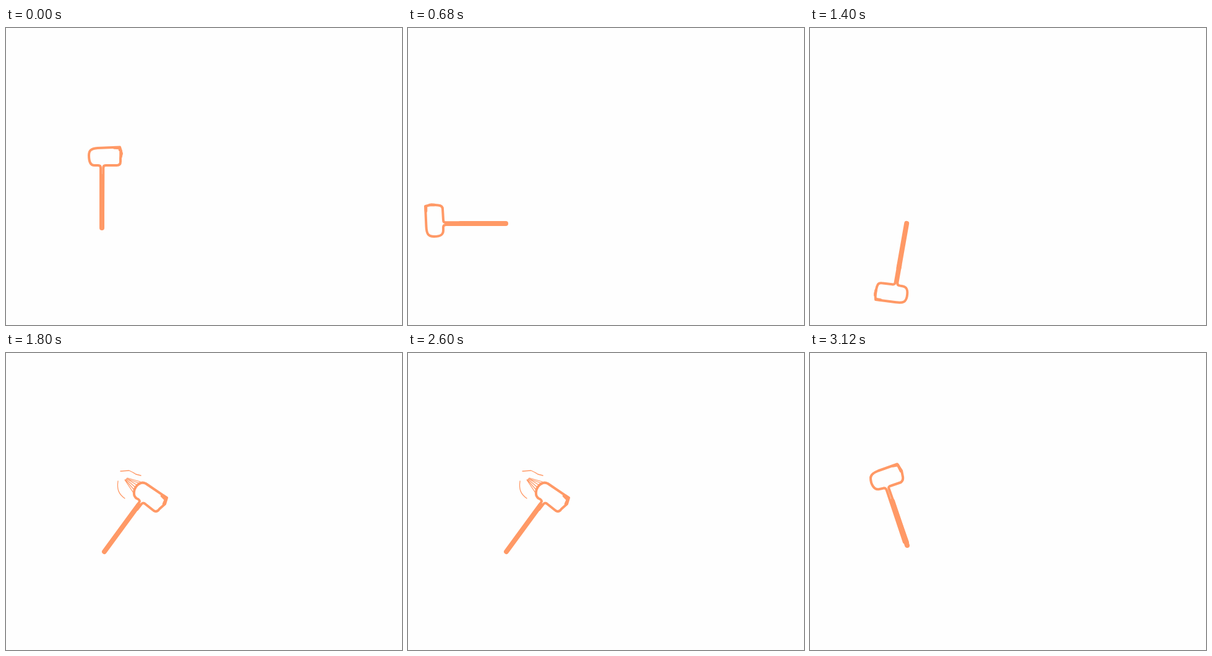
Write an HTML page that moves like this. It is 640x480 px and loops after 3160 ms.

```html
<!DOCTYPE html>
<html lang="en">
<head>
<meta charset="utf-8">
<title>Hammer</title>
<style>
html, body { margin: 0; width: 100%; height: 100%; overflow: hidden; background: #fefefe; }
svg { display: block; width: 640px; height: 480px; }
path { fill: none; stroke: #ff9966; stroke-linecap: round; stroke-linejoin: round; }
#grip { stroke-width: 8; }
#head { stroke-width: 4; }
#bumps { stroke-width: 4.5; }
#marks { stroke-width: 1.3; }
</style>
</head>
<body>
<svg viewBox="0 0 640 480">
  <g id="hammer">
    <path id="grip"/><path id="head"/><path id="bumps"/>
    <path id="marks"/>
  </g>
</svg>
<script>
const TICK = 40, LOOP = 3160, CYCLE = 20;

// Hand-drawn key poses: handle, outline, thick spots, thin effect lines.
const poses = {
  up: {
    pivot: "155 322",
    grip: "M155 240V323",
    head: "M153 300V226Q153 222 149 222H143C135 222 134 212 134 206C134 198 137 195 148 194L184 192.5L187 203L185 210V216Q185 222 179 222H161Q157.3 222 157.3 226L157 300",
    bumps: "M175 193.5L184 194V197M185.5 198V208"
  },
  swing: {
    pivot: "158 321",
    grip: "M159 321L214 246",
    head: "M212 246L216 240Q216 237 211 235C205 231 206 221 211 215Q218 207 226 211L260 234L257 244L248 252Q244 258 239 255L225 244Q222 241 219 244L212 253",
    bumps: "M252 231L258 237L255 244",
    marks: "M185 191L199 190Q206 193 210 196L218 198M181 207C179 220 182 228 192 235" +
      "M196 202L217 208M195 203L214 210M195 203L211 213M194 204L209 217M193 205L207 221M192 205L206 226"
  },
  hit: {
    pivot: "156 321",
    grip: "M155 322L225 318",
    head: "M200 318L252 314.5Q256 314 256 311V302C256 296 262 294 270 294H276C283 295 284 305 286 314L288 331C288 338 283 340.5 272 340.5C262 340.5 259 338 259 334L258 322Q257 318.6 252 319L200 321",
    bumps: "M284 302L285.5 316",
    marks: "M259 345C256 349 260 348 263 350C265 352 262 354 265 356L269 356.5M288 347C283 352 289 352 291 353C289 357 293 360 296 361"
  },
  back: {
    pivot: "157 317",
    grip: "M85 316H158",
    head: "M90 314.3H60Q57 314 57 310L56 293Q56 287 49 286.5L38 285.5L28 288L29.5 321C30 333 33 337 42 337C53 337 57 334 57 327V322Q57 318 62 318H90",
    bumps: "M29 289V296M35 286H43"
  },
  lean: {
    pivot: "157 315",
    grip: "M133 239L157 311",
    head: "M152 306L124 222Q122 217 117 219L112 220C103 222 98 211 98 202C98 196 104 193 110 190.5L141 179.5L148 190L150 200Q151 206 147 209L131 214.5Q126 216 127.5 219L158 306",
    bumps: "M134 182.5L142 181L147 191"
  }
};

// One entry per tick: pose, turn in degrees, scale of the effect lines.
const steps = [
  ["up", 0], ["up", 0], ["up", 12], ["up", 12], ["up", 24],
  ["swing", 0, 1], ["swing", 18, 1], ["swing", 36, 1],
  ["hit", 0, 1.5], ["hit", 0, 1.5], ["hit", 0, 1],
  ["hit", 13], ["hit", 27], ["hit", 48],
  ["back", -110], ["back", -80], ["back", -38], ["back", 0],
  ["lean", 0], ["lean", 11]
];

const el = id => document.getElementById(id);
const start = performance.now();

function draw(now) {
  const time = Math.max(0, now - start) % LOOP;
  const [name, turn, scale] = steps[Math.floor(time / TICK) % CYCLE];
  const pose = poses[name];
  for (const part of ["grip", "head", "bumps"]) el(part).setAttribute("d", pose[part]);
  el("marks").setAttribute("d", scale ? pose.marks : "");
  el("marks").setAttribute("transform", scale > 1 ? `translate(270 335) scale(${scale}) translate(-270 -335)` : "");
  el("hammer").setAttribute("transform", `rotate(${turn} ${pose.pivot})`);
  requestAnimationFrame(draw);
}
draw(start);
</script>
</body>
</html>
```
